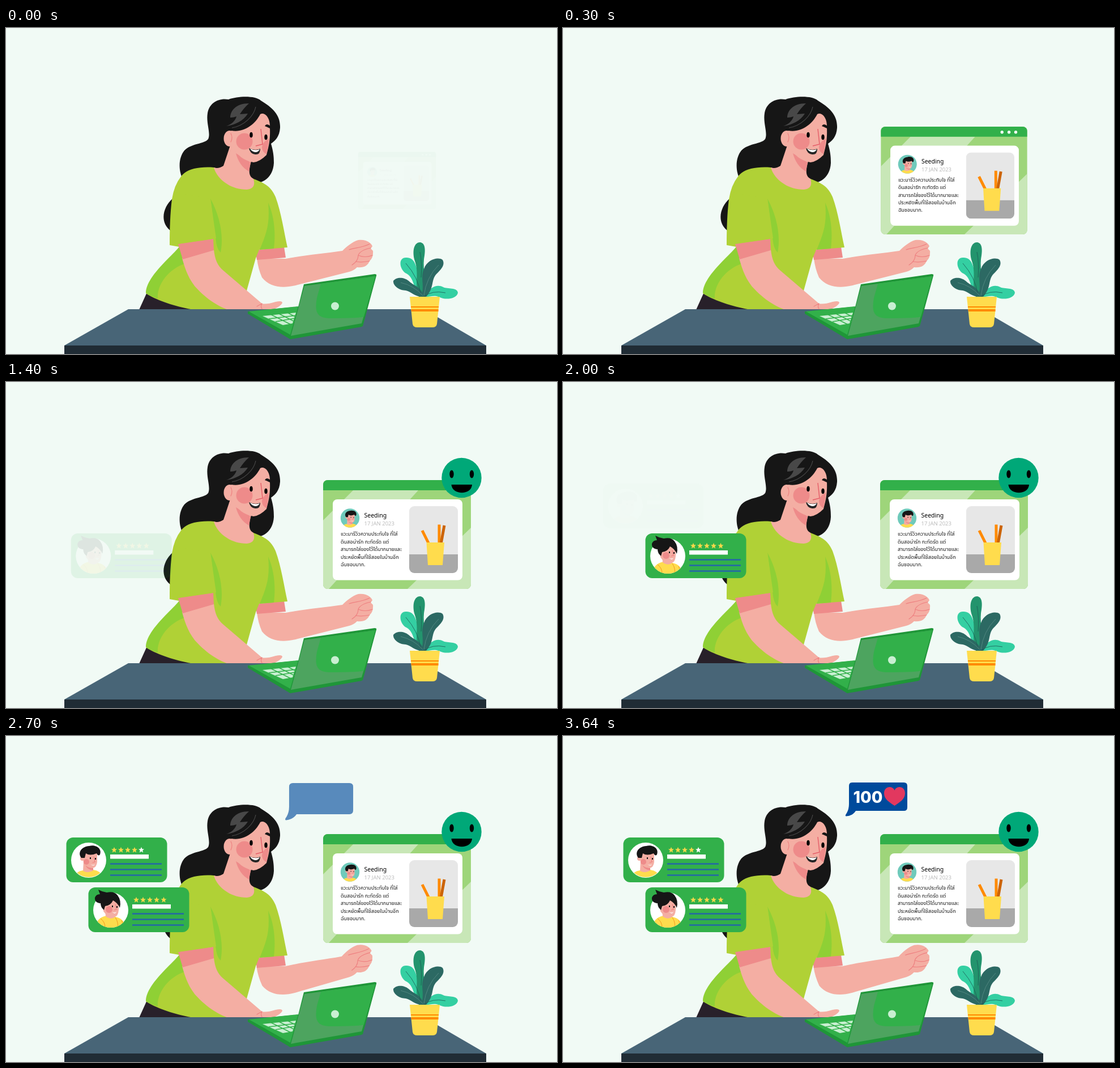
Write an HTML page that moves like this. It is 973 by 575 pixels and loops after 4020 ms.

```html
<!DOCTYPE html>
<html lang="th">
<head>
<meta charset="utf-8">
<title>Product review</title>
<style>
html, body { margin: 0; width: 100%; height: 100%; overflow: hidden; background: #f1faf5; }
svg { display: block; width: 100vw; height: 100vh; }
.skin { fill: #f4aea3; }
.blush { fill: #ee8b8a; }
.lime { fill: #b0d136; }
.shade { fill: #8fd035; }
.hair { fill: #161616; }
.green { fill: #32b04a; }
.yellow { fill: #ffdc4d; }
.line { fill: none; stroke: #ee8080; stroke-width: 1.2; stroke-linecap: round; }
.vein { fill: none; stroke: #1d5a55; stroke-width: .8; }
text { font-family: "Noto Sans", "Noto Sans Thai", "Open Sans", sans-serif; }
</style>
</head>
<body>
<svg viewBox="0 0 973 575">
<defs>
  <clipPath id="round"><circle r="31"/></clipPath>
  <clipPath id="frame"><rect x="560" y="173" width="261" height="192" rx="8"/></clipPath>
  <clipPath id="photo"><rect x="712" y="219" width="86" height="118" rx="9"/></clipPath>
  <path id="star" d="M0-5.2L1.4-1.7 5-1.6 2.2.8 3.1 4.4 0 2.4-3.1 4.4-2.2.8-5-1.6-1.4-1.7Z"/>
  <g id="man" clip-path="url(#round)">
    <path class="yellow" d="M-25 31Q-22 20-10 19L8 18Q22 20 25 31Z"/>
    <path class="skin" d="M-9 2L-10 20Q0 25 8 19V8Z"/>
    <path class="blush" d="M-6 10L8 15V19Q-2 18-6 10Z"/>
    <path class="skin" d="M-10-14H15V4Q14 14 7 15Q-8 14-10 0Z"/>
    <circle class="skin" cx="-11" cy="-2" r="4"/>
    <circle class="blush" cx="-4" cy="4" r="5"/>
    <path class="hair" d="M-13-3C-20-12-13-23 1-24C12-27 24-20 20-9Q17-5 14-11Q2-6-5-11L-7-3Z"/>
    <path d="M3-4v3M12-3v3" stroke="#161616" stroke-width="2"/>
    <path class="line" d="M9-5L11 4 7 5"/>
    <path d="M3 8Q8 11 11 8Q9 13 3 8Z" fill="#fff"/>
  </g>
  <g id="woman">
    <g clip-path="url(#round)">
      <path class="yellow" d="M-27 31Q-26 14-8 10L8 12Q24 15 26 31Z"/>
      <path d="M-18 15Q-10 21-10 31M8 13Q14 22 12 31M19 18L23 27" fill="none" stroke="#f09a20"/>
      <path class="skin" d="M-10 0L-9 11Q0 18 8 12V5Z"/>
      <path class="skin" d="M-14-10L4-20Q16-17 14 0Q13 12 6 12Q-8 11-13 2Z"/>
      <circle class="blush" cx="-3" cy="-1" r="6"/>
      <path d="M3-8v3M11-7v3" stroke="#161616" stroke-width="2"/>
      <path class="line" d="M8-10L10-1 6 0"/>
      <path d="M2 3Q7 6 10 3Q8 9 2 3Z" fill="#fff"/>
    </g>
    <path class="hair" d="M-22-36Q-15-32-7-31Q6-34 12-26Q19-17 16-4Q12-13 4-17Q0-8-10-7L-12 0Q-18-5-18-12Q-29-13-28-22Q-26-28-19-28Z"/>
  </g>
  <g id="review">
    <rect class="green" width="178" height="79" rx="12"/>
    <circle cx="39.5" cy="40" r="31" fill="#fff"/>
    <path d="M77.5 30H145.5V37.5H77.5Z" fill="#fff"/>
    <path d="M77.5 46.5H168.5M77.5 56.5H168.5M77.5 66.5H168.5" stroke="#2467a8" stroke-width="2.5"/>
    <g fill="#f9d84a">
      <use href="#star" x="84.5" y="22"/><use href="#star" x="96.5" y="22"/>
      <use href="#star" x="108.5" y="22"/><use href="#star" x="120.5" y="22"/>
    </g>
  </g>
</defs>

<!-- woman -->
<path class="hair" d="M393 126C410 120 440 119 450 128C470 140 485 153 484 176C483 192 475 199 468 204C472 218 473 226 473 238C472 258 461 269 447 273L380 280 310 262C304 245 306 227 315 216C328 203 350 205 357 196C362 185 353 168 356 150C359 132 375 123 393 126ZM294 301C278 315 270 342 291 358Z"/>
<path d="M250 464L235 497H340Z" fill="#28202a"/>
<g id="arm">
  <path class="skin" d="M443 406L494 407C530 400 560 398 594 393C602 385 612 377 622 374C636 372 645 379 647 385L644 389 648 393Q649 405 642 411Q637 424 620 422Q614 428 606 430L515 453C490 460 466 458 452 440Q445 424 443 406Z"/>
  <path class="line" d="M606 391C615 388 630 387 642 381M644 388Q625 392 622 401M647 401Q634 406 622 401M642 411Q628 414 618 412M622 401Q622 411 611 418"/>
</g>
<path class="blush" d="M440 392L491 386 494 405 443 409Z"/>
<path class="lime" d="M309 262C318 249 340 244 367 246L437 266C458 274 468 280 476 298C486 325 491 360 497 387L447 391 441 406 424 467 420 497H333C300 492 265 480 247 468C248 448 290 410 306 386L289 383C289 355 290 325 293 302Q297 277 309 262Z"/>
<path class="shade" d="M306 386C290 405 247 440 247 467Q255 474 268 477C266 455 285 425 318 415ZM361 301C377 330 385 365 379 396Q372 390 370 371ZM463 308C475 335 476 365 473 389L448 391C461 360 466 345 463 308Z"/>
<path class="skin" d="M311 406L367 391C369 408 373 419 384 428L452 486Q460 488 476 483Q488 480 488 485Q485 491 471 497H392C362 486 343 466 333 455C320 438 315 420 311 406Z"/>
<path class="line" d="M443 491L452 486M452 486Q449 492 452 495"/>
<path class="blush" d="M304 381L366 372 367 392 312 408Z"/>
<path class="lime" d="M289 383L371 371 361 301 300 290Z"/>
<path class="skin" d="M367 246C372 265 395 285 425 285C438 284 440 276 437 266C430 262 427 256 433 235L400 195 384 243Q375 249 367 246Z"/>
<path class="blush" d="M406 221L432 237Q430 247 429 253C417 246 410 236 406 221Z"/>
<ellipse class="skin" cx="395" cy="195" rx="10.5" ry="14"/>
<path class="skin" d="M398 181C420 185 440 170 449 152C457 148 467 158 466 176C467 200 463 212 460 224Q448 236 437 237C420 234 408 225 399 207Z"/>
<path class="line" d="M397 186Q401 193 397 201"/>
<circle class="blush" cx="421" cy="200" r="14.5"/>
<path class="blush" d="M464 195Q452 202 452 211Q453 220 460 222Q463 210 464 195Z"/>
<path d="M457 173Q460 167 467 173L466 177Q460 174 457 173Z" fill="#161616"/>
<ellipse cx="433" cy="188.5" rx="2.7" ry="4.8"/>
<ellipse cx="459" cy="192.5" rx="2.7" ry="4.8"/>
<path d="M450 178L453 205 441 208" fill="none" stroke="#e55d68" stroke-width="1.4"/>
<path d="M429 212Q440 217 449 213Q449 224 440 223Q431 222 429 212Z" fill="#252525"/>
<path d="M431 213Q440 217 448 214Q446 219 440 219Q434 218 431 213Z" fill="#fff"/>
<path d="M429 133C405 133 396 147 396 158Q402 158 407 156C405 164 398 170 389 173C405 171 420 163 427 151L413 152Q420 141 429 133Z" fill="#484848"/>
<path d="M441 139C438 155 420 173 399 176" fill="none" stroke="#484848" stroke-width="1.2"/>

<!-- desk, laptop, plant -->
<path d="M216 496H738L848 560H103Z" fill="#486577"/>
<path d="M103 560H848V575H103Z" fill="#202c35"/>
<path d="M427 500L520 491 629 523 628 527 502 549 427 504Z" fill="#1f9638"/>
<path class="green" d="M429 500L516 491 502 541Z"/>
<path d="M453 508L512 502 506 521 489 524Z" fill="#c9efd2"/>
<path d="M464 513L512 507M476 518L510 512M467 505L505 524M482 504L510 518M497 502L512 510" stroke="#32b04a" stroke-width="1.5"/>
<path d="M526 452L651 434Q655 434 654 437L630 526 502 548Z" fill="#1f9638"/>
<path d="M527 455L652 438 628 521 503 543Z" fill="#4da45f"/>
<path class="green" d="M556 451L652 438 632 509Q629 512 570 512C545 511 546 495 549 476Z"/>
<circle cx="581" cy="490.5" r="7" fill="#c9efd2"/>
<path d="M738 474C750 455 762 452 772 457C780 461 797 457 798 467C796 478 776 480 766 475C756 470 748 475 738 474ZM732 472C716 455 722 440 705 432C693 422 694 405 706 405C722 404 724 420 728 433C733 448 736 460 736 474Z" fill="#34cfa2"/>
<path d="M729 474C720 450 731 435 721 408C717 390 722 378 731 378C741 379 741 392 738 408C736 425 742 450 740 474Z" fill="#23946d"/>
<path d="M733 474C740 455 731 440 738 425C744 408 763 403 771 409C776 418 768 426 760 434C750 445 757 457 742 474ZM737 474C722 475 716 465 706 463C695 463 683 455 684 446C690 438 704 440 711 446C720 455 728 453 739 472Z" fill="#2c6963"/>
<path class="vein" d="M738 474Q752 462 776 467M732 468Q728 440 706 415M733 440Q735 415 731 395"/>
<path class="vein" d="M738 472Q742 440 764 418M736 472Q720 454 697 449" style="stroke:#5a8d87"/>
<path class="yellow" d="M713 474H766L761 522Q760 528 753 528H726Q719 528 718 522Z"/>
<path d="M715 491H764V493H715ZM715.5 496H763.5V500H716Z" fill="#ff8a00"/>

<!-- review window -->
<g id="post">
  <g clip-path="url(#frame)">
    <path d="M560 173H821V365H560Z" fill="#9ed57a"/>
    <path d="M613 191H728L570 365H560V244ZM821 257V365H709Z" fill="#c8e7b7"/>
    <path class="green" d="M560 173H821V191H560Z"/>
  </g>
  <g fill="#fff">
    <circle cx="776" cy="183" r="2.7"/><circle cx="788.5" cy="183" r="2.7"/><circle cx="800.5" cy="183" r="2.7"/>
    <rect x="577" y="207" width="229" height="142.5" rx="8"/>
  </g>
  <g clip-path="url(#photo)">
    <path d="M712 219H798V304H712Z" fill="#e7e7e7"/>
    <path d="M712 304H798V337H712Z" fill="#a9a9a9"/>
  </g>
  <g stroke-width="5" stroke="#ff8a00">
    <path d="M735 262L747 286M765 251.500V286"/><path d="M774 253L768 286" stroke="#cc6406"/>
  </g>
  <path class="yellow" d="M742.5 283H774L771 323H745Z"/>
  <circle cx="607.5" cy="240" r="16.7" fill="#6fcabb"/>
  <use href="#man" transform="translate(607.5 240) scale(.54)"/>
  <text x="632.5" y="238.5" font-size="10.5" font-weight="500">Seeding</text>
  <text x="632.5" y="253" font-size="9.5" fill="#bdbdbd">17 JAN 2023</text>
  <g font-size="9" fill="#161616">
    <text x="591" y="271">แวะมารีวิวความประทับใจ ที่ใส่</text>
    <text x="591" y="284.5">ดินสอน่ารัก กะทัดรัด แต่</text>
    <text x="591" y="298">สามารถใส่ของไว้ได้มากมายและ</text>
    <text x="591" y="311.5">ประหยัดพื้นที่ใช้สอยในบ้านอีก</text>
    <text x="591" y="325">ฉันชอบมาก.</text>
  </g>
</g>

<g id="smiley">
  <circle cx="804.5" cy="169" r="35.2" fill="#00a878"/>
  <ellipse cx="787" cy="162.5" rx="3.7" ry="7"/><ellipse cx="822.5" cy="162.5" rx="3.7" ry="7"/>
  <path d="M786.5 181H823C822 200 788 200 786.5 181Z"/>
</g>

<g id="cardWoman"><g transform="translate(145.5 267)">
  <use href="#review"/><use href="#star" x="133" y="22" fill="#f9d84a"/>
  <use href="#woman" x="39.5" y="40"/>
</g></g>
<g id="cardMan"><g transform="translate(106.5 179)">
  <use href="#review"/><use href="#star" x="132.5" y="22" fill="#fff"/>
  <use href="#man" x="39.5" y="39"/>
</g></g>

<path id="bubble" d="M511 82H602Q608 82 608 88V126Q608 132 602 132H517Q511 141 500 141.5Q497 141 501 136Q505 129 505 120V88Q505 82 511 82Z" fill="#004a9c"/>
<text id="count" x="512.5" y="118" font-size="28.5" font-weight="800" fill="#fff" style="font-family:Inter,sans-serif">100</text>
<path id="heart" d="M585.5 123C575 116 567 111 567 101C567 88 582 87 585.5 96C589 87 604 88 604 101C604 111 596 116 585.5 123Z" fill="#e2385f"/>
</svg>
<script>
const LOOP = 4020;
const clamp = v => Math.min(1, Math.max(0, v));
const easeOut = (p, power) => 1 - (1 - p) ** power;

function place(id, opacity, cx, cy, scale, dx = 0, dy = 0) {
  const el = document.getElementById(id);
  el.setAttribute('opacity', clamp(opacity));
  el.setAttribute('transform',
    `translate(${cx + dx} ${cy + dy}) scale(${scale}) translate(${-cx} ${-cy})`);
}

function draw(t) {
  const progress = (start, length) => clamp((t - start) / length);
  const pop = (id, start, length, cx, cy) => {
    const p = progress(start, length);
    place(id, p * 1.7, cx, cy, 0.5 + 0.5 * easeOut(p, 4));
  };
  const slide = (id, start, length) => {
    const p = progress(start, length);
    place(id, p * 2.2, 0, 0, 1, -36 * (1 - p) ** 4);
  };

  pop('post', -6, 486, 690.5, 269);
  const smile = progress(800, 480);
  place('smiley', smile > 0 ? 1 : 0, 804.5, 169, easeOut(smile, 3));
  slide('cardWoman', 1380, 540);
  slide('cardMan', 2000, 460);

  const b = progress(2460, 540), rest = (1 - b) ** 2;
  place('bubble', b * 1.42, 556.5, 112, 1 + 0.32 * rest, 0, 13 * rest);
  pop('count', 3000, 540, 539, 108);
  pop('heart', 3540, 100, 585.5, 107);

  const lift = progress(2020, 440);
  document.getElementById('arm').setAttribute('transform', `rotate(${-1.9 * lift} 465 425)`);
}

const begin = performance.now();
function tick() {
  draw((performance.now() - begin) % LOOP);
  requestAnimationFrame(tick);
}
tick();
</script>
</body>
</html>
```
